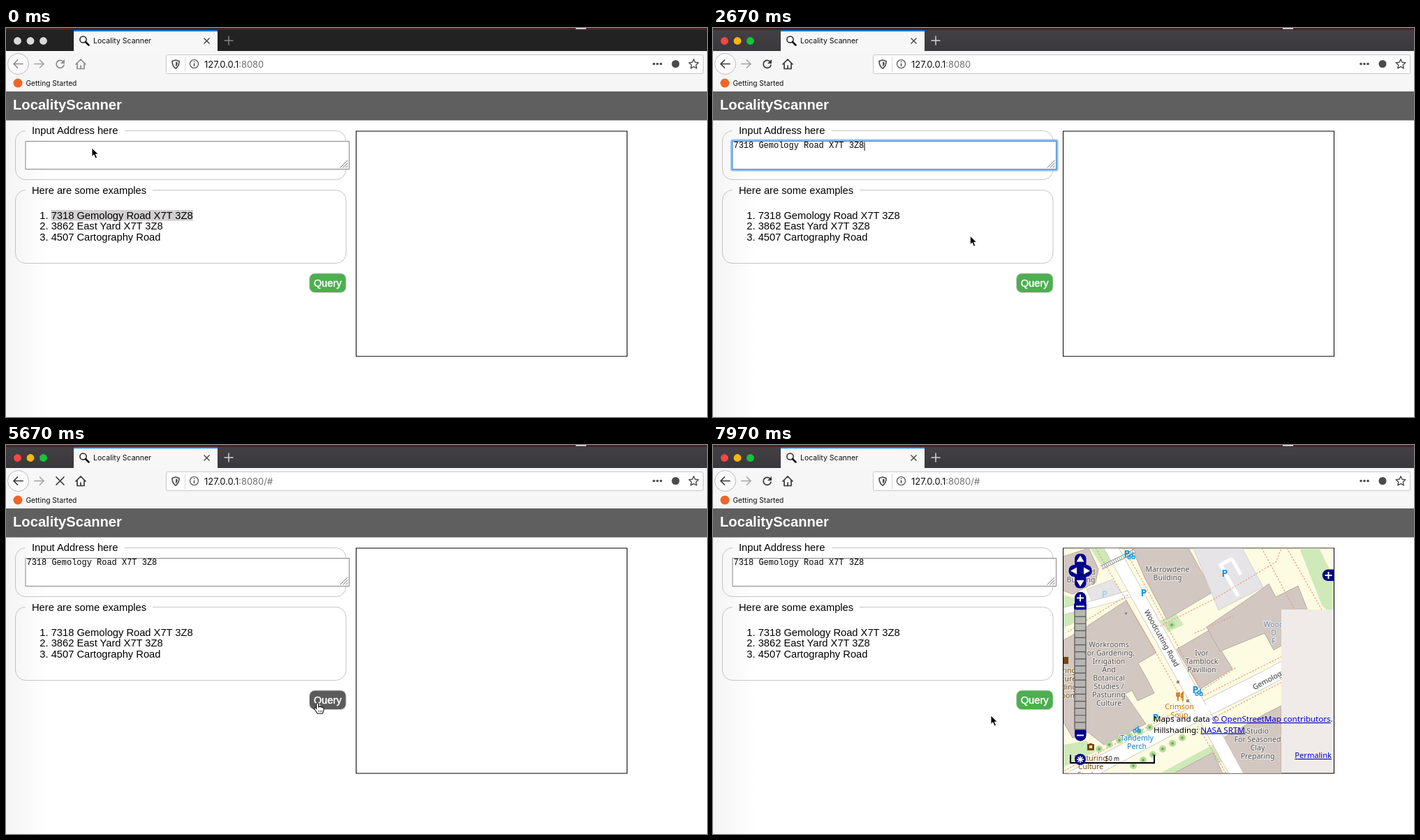
An HTML page that plays this animation: 1004x558 px, repeating every 8000 ms.

```html
<!DOCTYPE html>
<html lang="en">
<head>
<meta charset="utf-8">
<title>Locality Scanner</title>
<style>
html, body { margin: 0; width: 100%; height: 100%; overflow: hidden; background: #fff; }
svg { display: block; width: 1004px; height: 558px; }
text { white-space: pre; }
.ui { font-family: Inter, sans-serif; fill: #0c0c0d; }
.page { font-family: "Liberation Sans", Arial, sans-serif; font-size: 14.69px; fill: #000; }
.mono { font-family: "Liberation Mono", monospace; font-size: 11.97px; fill: #000; }
.map { font-family: "Noto Sans", "Open Sans", sans-serif; }
.credit { font-size: 11.6px; fill: #000; }
.link { fill: #0000c8; text-decoration: underline; }
.line { fill: none; stroke: currentColor; stroke-width: 1.7; stroke-linecap: round; stroke-linejoin: round; }
.building { fill: #d2c7c1; stroke: #b9aaa0; stroke-width: 1; }
.grass { fill: #cfe9b8; }
.lot { fill: #e6e4e7; stroke: #d5d0d0; }
.path { fill: none; stroke: #ee9a8c; stroke-width: 1.2; stroke-dasharray: 2.5 2; }
.navy { fill: #00008b; }
</style>
</head>
<body>
<svg viewBox="0 0 1004 558" xmlns="http://www.w3.org/2000/svg">
  <defs>
    <linearGradient id="shade"><stop stop-color="#f4f4f4"/><stop offset="1" stop-color="#fff"/></linearGradient>
    <linearGradient id="bar" x2="0" y2="1"><stop stop-color="#444145"/><stop offset="1" stop-color="#39383b"/></linearGradient>
    <clipPath id="frame"><rect x="502" y="148.5" width="387" height="322"/></clipPath>
    <g id="city"></g>
  </defs>

  <rect width="1004" height="558" fill="#fff"/>
  <rect y="132" width="60" height="426" fill="url(#shade)"/>

  <!-- browser window -->
  <rect id="strip" width="1004" height="33"/>
  <rect width="1004" height="3" fill="#432628"/>
  <rect x="816" width="15" height="1.5" fill="#eee"/>
  <g id="lights"><circle cx="16.5" cy="18.5" r="5.4"/><circle cx="35" cy="18.5" r="5.4"/><circle cx="53.5" cy="18.5" r="5.4"/></g>
  <rect x="97" y="3" width="206" height="30" fill="#f7f7f8"/>
  <rect x="97" y="3" width="206" height="2" fill="#1583e8"/>
  <circle cx="110.500" cy="16.500" r="4.600" fill="#fff" stroke="#222" stroke-width="1.500"/>
  <path d="M114 20l4.500 4.500" stroke="#111" stroke-width="2.600" stroke-linecap="round"/>
  <text class="ui" x="125" y="22" font-size="10.5">Locality Scanner</text>
  <path d="M283.500 14.500l8 8m0-8l-8 8" stroke="#444" stroke-width="1.400"/>
  <path id="plus" d="M312.500 18h13M319 11.500v13" stroke-width="1.500"/>

  <rect y="33" width="1004" height="58" fill="#f6f6f7"/>
  <g id="tools">
    <circle cx="17.500" cy="51.500" r="15" fill="#fbfbfb" stroke="#bcbcbc"/>
    <path class="line" d="M24 51.500H11M16.500 46l-5.500 5.500 5.500 5.500"/>
    <g id="reload"><path class="line" d="M82 48.500a5.500 5.500 0 1 0 1 4.500"/><path fill="currentColor" d="M84 45v6h-6z"/></g>
    <path id="stop" class="line" d="M72 46l11 11m0-11l-11 11"/>
    <path class="line" d="M100 52l7-7 7 7M102 51v7.500h10V51M107 58v-4"/>
  </g>
  <path class="line" color="#a4a4a6" d="M41 51.500h13M48.500 46l5.500 5.500-5.500 5.500"/>
  <rect x="229.500" y="38.500" width="769" height="27" rx="2" fill="#fff" stroke="#c8c8c9"/>
  <g color="#4a4a4b">
    <path class="line" stroke-width="1.400" d="M238 47.500l5-1.500 5 1.500c0 5-1 8-5 10.500-4-2.500-5-5.500-5-10.500z"/>
    <path d="M243 48.500l2.700 .8c0 3-.7 4.700-2.700 6.200z" fill="currentColor"/>
    <path d="M256.500 41v22" stroke="#d8d8d8"/>
    <circle cx="269.500" cy="51.500" r="6" fill="none" stroke="currentColor" stroke-width="1.200"/>
    <path d="M269.500 50.500v4.500M269.500 47.500v1.600" stroke="currentColor" stroke-width="1.500"/>
    <g fill="currentColor"><circle cx="928" cy="51.500" r="1.800"/><circle cx="933" cy="51.500" r="1.800"/><circle cx="938" cy="51.500" r="1.800"/><circle cx="959" cy="51.500" r="5.500"/></g>
    <path id="star" class="line" style="stroke-width:1.4"/>
  </g>
  <text class="ui" x="284" y="56.500" font-size="12.950">127.0.0.1<tspan id="port" fill="#707072"></tspan></text>
  <circle cx="17" cy="79" r="6.500" fill="#f0642a"/>
  <text class="ui" x="28.500" y="83" font-size="10.2">Getting Started</text>

  <!-- page -->
  <rect y="91" width="1004" height="41.500" fill="#5f5f5f"/>
  <text class="page" x="10" y="117" style="font-size:20.2px;font-weight:700;fill:#fff">LocalityScanner</text>
  <g fill="none" stroke="#c4c4c4">
    <path d="M28 147.500a14.500 14.500 0 0 0-14.500 14.500v41a14.500 14.500 0 0 0 14.500 14.500H472.500a14.500 14.500 0 0 0 14.500-14.500V162a14.500 14.500 0 0 0-14.500-14.500H170"/>
    <path d="M28 232.500a14.500 14.500 0 0 0-14.500 14.500v76a14.500 14.500 0 0 0 14.500 14.500H472.500a14.500 14.500 0 0 0 14.500-14.500V247a14.500 14.500 0 0 0-14.500-14.500H210"/>
  </g>
  <text class="page" x="37" y="152">Input Address here</text>
  <text class="page" x="37" y="238">Here are some examples</text>
  <rect id="selection" x="64.500" y="261" width="203.500" height="15.500" fill="#d2d0d1"/>
  <text class="page" x="48.300" y="273.500">1. 7318 Gemology Road X7T 3Z8</text>
  <text class="page" x="48.300" y="289.300">2. 3862 East Yard X7T 3Z8</text>
  <text class="page" x="48.300" y="305">3. 4507 Cartography Road</text>

  <rect id="glow" x="26.500" y="161" width="466.500" height="43" rx="2" fill="none" stroke="#8fbff5" stroke-width="3"/>
  <rect id="box" x="28" y="162.500" width="463.500" height="40" fill="#fff"/>
  <path d="M478.500 200.500l11-11M482.500 200.500l7-7M486.500 200.500l3-3" stroke="#777"/>
  <text id="entry" class="mono" x="29.500" y="172">7318 Gemology Road X7T 3Z8</text>
  <path id="caret" stroke="#000"/>

  <rect id="button" x="434.500" y="352" width="52.500" height="27.500" rx="8" stroke="#c9cfc9"/>
  <text class="page" x="440.700" y="370.500" style="fill:#fff;stroke:#fff;stroke-width:.45px">Query</text>

  <!-- map -->
  <rect id="ground" x="501.500" y="148" width="388" height="323" stroke="#000"/>
  <g id="tiles" clip-path="url(#frame)"></g>
  <g id="controls">
    <rect class="navy" x="518" y="156" width="16.500" height="49.500" rx="7"/>
    <rect class="navy" x="509.500" y="172" width="33" height="17" rx="8"/>
    <path fill="#fff" d="M526 158.500l5.500 9h-11zM526 203l5.500-9h-11zM512 180.500l9-5v10zM540 180.500l-9-5v10z"/>
    <path class="navy" d="M518 229v-10a8 8 0 0 1 16.500 0v10z"/>
    <rect x="518" y="236" width="16" height="172" fill="#b4b4b1" fill-opacity=".9"/>
    <path id="rungs" fill="none" stroke="#555" stroke-width="1.200"/>
    <rect class="navy" x="517" y="227" width="18" height="9" rx="1.500"/>
    <path class="navy" d="M518 408.500h16.500v8a8 8 0 0 1-16.500 0z"/>
    <path d="M521 219.500h10M526 214.500v10M520 231.500h12M521 416.500h10" stroke="#fff" stroke-width="2"/>
    <path class="navy" d="M889 178.500h-8a8.300 8.300 0 0 0 0 16.600h8z"/>
    <path d="M876.500 187h10M881.500 182v10" stroke="#fff" stroke-width="2"/>
    <path d="M512 444.500v11.500h120v-11.500" fill="none" stroke="#000" stroke-width="2"/>
    <circle class="navy" cx="526" cy="451" r="8"/>
    <path d="M522.500 447.500l7 7m0-7l-7 7M526 446v10M521 451h10" stroke="#fff" stroke-width="1.500"/>
    <g class="map">
      <text x="572" y="453" font-size="8.500" text-anchor="middle">50 m</text>
      <text class="credit" x="631" y="397">Maps and data <tspan class="link">© OpenStreetMap contributors</tspan>.</text>
      <text class="credit" x="631" y="412.500">Hillshading: <tspan class="link">NASA SRTM</tspan>.</text>
      <text class="credit link" x="886" y="449" text-anchor="end" style="font-size:11.1px">Permalink</text>
    </g>
  </g>

  <!-- pointer shapes, hot spot at 0,0 -->
  <g id="arrow"><path d="M0 0v12.500l2.900-2.700 2.300 5.200 2.300-1-2.200-5h4z" fill="#000" stroke="#fff" stroke-width=".9"/></g>
  <g id="beam"><path d="M-3-6.500q3 0 3 2 0-2 3-2M-3 6.500q3 0 3-2 0 2 3 2M0-5V5M-1.500 1.500h3" fill="none" stroke="#222" stroke-width="1.200"/></g>
  <g id="hand"><path d="M-1.500 0q1.500-2 2.800 0l.5 5 1-.8q1.300-.5 2 .7 1.400-.7 2.200.6 1.600-.4 2 1.200v3l-1.500 4.500H0l-2.500-4-2.300-3q0-2 2-1.200l1.500 1.300z" fill="#fff" stroke="#111" stroke-width="1.100"/><path d="M2 9.500v3M4.300 9.500v3M6.300 9.500v3" stroke="#333" stroke-width=".8"/></g>
</svg>

<script>
const LOOP = 8000;
const ACTIVATE = 400, PASTE = 2150, CLICK = 3450, GROUND = 6200, READY = 7000;
const BLINK = 567;
const $ = id => document.getElementById(id);
const set = (el, attrs) => { for (const k in attrs) el.setAttribute(k, attrs[k]); };
const show = (id, on) => $(id).style.display = on ? "" : "none";

// time, x, y of the pointer's hot spot
const route = [
  [0, 123, 172], [400, 124, 173], [2180, 124, 173], [2300, 165, 195], [2500, 290, 262],
  [2670, 368, 298], [2850, 425, 345], [3000, 446, 371], [6720, 446, 371],
  [6850, 434, 376], [7050, 411, 384], [7220, 404, 386], [7600, 398, 388], [LOOP, 398, 388]
];
// x, y, width, height, start of the fade
const tiles = [
  [502, 236, 77, 235, 7250], [579, 236, 235, 235, 7400], [502, 148, 77, 88, 7460],
  [579, 148, 235, 88, 7500], [814, 148, 75, 88, 7560]
];

const poly = (cls, pts) => `<polygon class="${cls}" points="${pts}"/>`;
const path = d => `<path class="path" d="${d}"/>`;
const road = (d, w) => `<path d="${d}" fill="none" stroke="#c9c4be" stroke-width="${w + 1.6}"/>
  <path d="${d}" fill="none" stroke="#fff" stroke-width="${w}"/>`;
const label = (x, y, lines, fill = "#555", extra = "") => lines.split("|").map((s, i) =>
  `<text class="map" x="${x}" y="${y + i * 12}" font-size="10.500" text-anchor="middle" fill="${fill}"
    stroke="#fff" stroke-opacity=".6" stroke-width="2" paint-order="stroke" ${extra}>${s}</text>`).join("");
const parking = (x, y, fill = "#1593dc") =>
  `<text class="map" x="${x}" y="${y + 5}" font-size="14" font-weight="600" text-anchor="middle" fill="${fill}">P</text>`;
const bike = (x, y) => `<g fill="none" stroke="#1593dc" stroke-width="1.300"><circle cx="${x - 3}" cy="${y + 2}" r="2.200"/>
  <circle cx="${x + 3}" cy="${y + 2}" r="2.200"/><path d="M${x - 3} ${y + 2}l2-4h3l1 4M${x + 1} ${y - 4}h2"/></g>`;
const tree = (x, y) => `<circle cx="${x}" cy="${y}" r="5" fill="#b7dda0"/><circle cx="${x}" cy="${y}" r="2" fill="#7da565"/>`;

// one row of trees on each side of the avenue
function trees() {
  let s = "";
  for (let i = 0; i < 6; i++) s += tree(602 + i * 14, 460 - i * 8) + tree(553 + i * 14.5, 436 - i * 6.2);
  return s;
}

function buildCity() {
  const main = "M502 486L600 434 690 386 790 336 889 282", cross = "M566 140L622 240 694 370 753 478";
  $("city").innerHTML = [
    `<rect x="502" y="148" width="388" height="323" fill="#fdfce2"/>`,
    poly("grass", "840,148 868,148 889,190 889,245 872,230"),
    poly("grass", "502,215 525,222 535,248 502,262"),
    poly("grass", "540,148 562,148 572,168 556,172"),
    poly("grass", "502,430 535,424 548,440 502,462"),
    poly("grass", "640,252 662,240 674,258 652,268"),
    poly("grass", "642,470 725,425 738,450 700,470"),
    poly("building", "502,160 538,148 552,178 548,197 515,214 502,209"),
    poly("building", "600,148 681,148 716,211 650,250 618,190"),
    poly("building", "502,280 534,262 537,259 592,223 635,298 609,313 624,340 632,356 608,367 600,352 590,357 620,400 560,430 537,412 515,420 502,398"),
    poly("building", "664,293 710,266 744,321 698,350"),
    poly("building", "707,261 776,214 796,199 806,218 838,202 852,238 814,288 803,294 790,270 726,296"),
    poly("building", "719,427 790,386 814,374 814,471 744,471"),
    poly("building", "660,471 716,441 730,471"),
    poly("lot", "688,148 758,148 788,204 724,237"),
    poly("lot", "535,207 572,193 586,213 546,230"),
    `<path d="M743 163L727 172 752 217M743 163L756 186" fill="none" stroke="#fff" stroke-width="5"/>`,
    road("M502 238Q550 228 604 211", 9),
    road(main, 22), road(cross, 18),
    `<path d="M602 214L608 210M672 396L712 375" stroke="#fff" stroke-width="9"/>`,
    path("M588 148L618 200 688 330 702 360 889 266"),
    path("M548 148L598 234 668 358 676 376 502 468"),
    path("M508 268L596 214M640 260L716 222 806 168 814 148M786 148L850 268"),
    path("M694 403L735 471M712 394L889 301M822 148L874 240M690 270L745 245M748 320L700 352"),
    `<path d="M556 176L580 164 604 152" fill="none" stroke="#999" stroke-width="6"/><path d="M556 176L580 164 604 152" fill="none" stroke="#fff" stroke-width="4" stroke-dasharray="2 1"/>`,
    trees(),
    tree(657, 258),
    `<path d="M664 338h4v4h-4zM678 365h4v4h-4zM590 240h3v3h-3z" fill="#9b8778"/>`,
    parking(593, 156), bike(599, 159), parking(617, 212), parking(733, 184),
    parking(561, 214, "#a9d2ec"), parking(691, 351), bike(696, 355), parking(634, 391), bike(607, 408),
    `<path d="M664 355v4q0 2 2 2v6M668 355v4q0 2-2 2M666 355v5M673 367v-12q-3 2-2 7h2" fill="none" stroke="#c77400" stroke-width="1.600"/>`,
    `<path d="M501 304h8v10h-8zM536 429h3v6h4v-6h3v9h-10zM539 428h4v3h-4z" fill="#734a08"/>`,
    label(541, 186, "od") + label(527, 197, "Building"),
    label(651, 182, "Marrowdene|Building"),
    label(567, 290, "Workrooms|For Gardening,|Irrigation|And|Botanical|Studies /|Pasturing|Culture"),
    label(700, 302, "Ivor|Tamblock|Pavillion"),
    label(780, 414, "Studio|For Seasoned|Clay|Preparing"),
    label(668, 379, "Crimson|Soup", "#c77400"),
    label(607, 424, "Tandemly|Perch", "#0b84cc"),
    label(541, 453, "Pasturing|Culture|Student", "#734a08"),
    label(510, 327, "ring|ture|ding|oom", "#734a08"),
    label(803, 261, "Wood|D|F", "#6583a8"),
    label(643, 281, "Woodcutting Road", "#333", `transform="rotate(61 643 277)"`),
    label(796, 340, "Gemology", "#333", `transform="rotate(-28 796 336)"`)
  ].join("");
}

function build() {
  buildCity();
  $("tiles").innerHTML = tiles.map(([x, y, w, h], i) =>
    `<clipPath id="cut${i}"><rect x="${x}" y="${y}" width="${w}" height="${h}"/></clipPath>
     <use href="#city" clip-path="url(#cut${i})"/>`).join("");
  let star = "";
  for (let i = 0; i < 10; i++) {
    const r = i % 2 ? 3.4 : 7.2, a = (i / 5 - .5) * Math.PI;
    star += `${i ? "L" : "M"}${985 + r * Math.cos(a)} ${52 + r * Math.sin(a)}`;
  }
  set($("star"), { d: star + "z" });
  let rungs = "M518 236v172M534 236v172";
  for (let i = 0; i <= 17; i++) rungs += `M518 ${236 + i * 172 / 17}h16`;
  set($("rungs"), { d: rungs });
}

function pointerAt(t) {
  const i = Math.max(1, route.findIndex(p => p[0] > t));
  const [a, b] = [route[i - 1], route[i]];
  const u = (t - a[0]) / (b[0] - a[0]);
  return [a[1] + (b[1] - a[1]) * u, a[2] + (b[2] - a[2]) * u];
}

function draw(t) {
  const active = t >= ACTIVATE, focus = active && t < CLICK, pasted = t >= PASTE;
  const loading = t >= CLICK && t < READY;

  set($("strip"), { fill: active ? "url(#bar)" : "#222223" });
  set($("plus"), { stroke: active ? "#d4d4d4" : "#858585" });
  set($("tools"), { color: active ? "#38383a" : "#8c8c8e" });
  [...$("lights").children].forEach((c, i) =>
    set(c, { fill: active ? ["#fc4540", "#fdb60d", "#15c53a"][i] : "#dadada" }));
  show("reload", !loading);
  show("stop", loading);
  $("port").textContent = t < CLICK ? ":8080" : ":8080/#";

  show("selection", !active);
  show("glow", focus);
  set($("box"), { stroke: focus ? "#4583c4" : "#858585" });
  show("entry", pasted);
  const caretX = pasted ? 217 : 30;
  set($("caret"), { d: `M${caretX} 163.500v12.500` });
  show("caret", focus && Math.floor((t - (pasted ? PASTE : ACTIVATE)) / BLINK) % 2 === 0);

  const [x, y] = pointerAt(t);
  const hover = x > 434 && x < 487 && y > 352 && y < 380;
  const typing = active && x > 28 && x < 491 && y > 162 && y < 203;
  set($("button"), { fill: hover ? "#5b5b5b" : "#4caf50" });
  const shape = hover ? "hand" : typing ? "beam" : "arrow";
  for (const id of ["arrow", "beam", "hand"]) show(id, id === shape);
  set($(shape), { transform: `translate(${x} ${y})` });

  set($("ground"), { fill: t >= GROUND ? "#f0ebe8" : "#fff" });
  show("controls", t >= READY);
  $("tiles").querySelectorAll("use").forEach((el, i) =>
    set(el, { opacity: Math.min(1, Math.max(0, (t - tiles[i][4]) / 400)) }));
}

build();
const start = performance.now();
function tick() {
  draw((performance.now() - start) % LOOP);
  requestAnimationFrame(tick);
}
tick();
</script>
</body>
</html>
```
